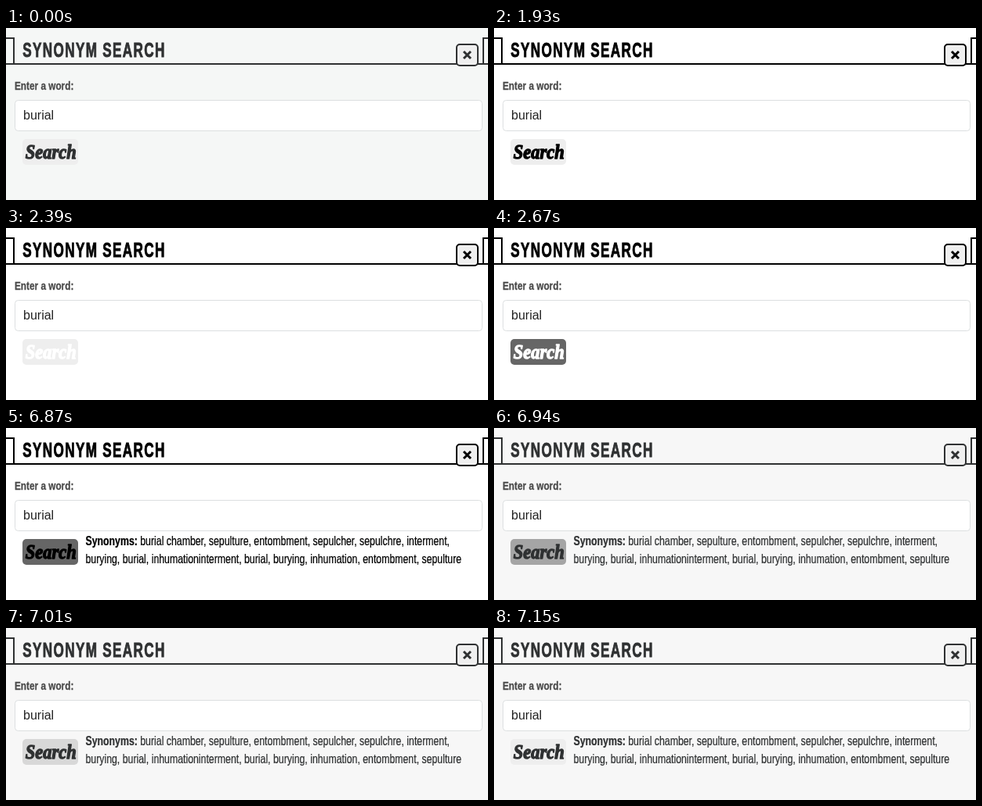
Animation, 615 px wide and 220 px high, one loop 7.68 s. Source, as an HTML page:

```html
<!DOCTYPE html>
<html lang="en">
<head>
<meta charset="utf-8">
<title>Synonym search</title>
<style>
  html, body { margin: 0; width: 100%; height: 100%; overflow: hidden; }
  svg { display: block; width: 615px; height: 220px; background: var(--page); }
  text { font: 16px "Liberation Sans", Arial, sans-serif; fill: var(--ink); white-space: pre; }
  .bold { font-weight: bold; }
  .title { font-size: 26px; font-weight: bold; letter-spacing: 2px; stroke: var(--ink); stroke-width: .9px; }
  .label { font-size: 15.2px; font-weight: bold; fill: #4a4a4a; stroke: #4a4a4a; stroke-width: .3px; }
  .field { fill: #222; }
  .script { font: italic bold 26px "Liberation Serif", Times, serif; fill: var(--caption); stroke: var(--caption); stroke-width: 1.4px; stroke-linejoin: round; }
  .line { fill: none; stroke: var(--ink); stroke-width: 2; }
  #results { stroke: var(--ink); stroke-width: .25px; }
</style>
</head>
<body>
<svg viewBox="0 0 615 220">
  <path class="line" d="M0 13H10V46M615 13H609V46M0 46H615"/>
  <text class="title" transform="translate(21.3 37) scale(.66 1)">SYNONYM SEARCH</text>

  <rect class="line" x="575" y="21" width="27" height="27" rx="4" style="fill:#efefef"/>
  <path class="line" d="M584 30l9 9m0-9l-9 9" style="stroke-width:3"/>

  <text class="label" transform="translate(11 79) scale(.776 1)">Enter a word:</text>
  <rect x="11.5" y="92.5" width="596" height="39" rx="4" fill="#fff" stroke="#dcdfe0"/>
  <text class="field" x="22" y="117">burial</text>

  <rect x="21" y="142" width="71" height="33" rx="5" fill="var(--button)"/>
  <text class="script" transform="translate(24.7 167) scale(.865 1)">Search</text>

  <g id="results" transform="translate(101.5 150) scale(.77 1)">
    <text><tspan class="bold">Synonyms: </tspan>burial chamber, sepulture, entombment, sepulcher, sepulchre, interment,</text>
    <text y="23">burying, burial, inhumationinterment, burial, burying, inhumation, entombment, sepulture</text>
  </g>
</svg>
<script>
const LOOP = 7680, STEP = 70;
const FOCUS = 1930, HOVER = 2390, ANSWER = 5610, LEAVE = 6870, BLUR = 6940;
const EASE = [0, .46, .84, .97, 1];
const results = document.getElementById("results");
const setVar = (name, value) => document.documentElement.style.setProperty("--" + name, value);

// Eased progress of a stepped fade that begins at start.
function fade(t, start) {
  const i = Math.floor((t - start) / STEP);
  return i < 0 ? 0 : EASE[Math.min(i, EASE.length - 1)];
}

function draw(now) {
  const t = now % LOOP;
  const active = t >= FOCUS && t < BLUR;
  const hovered = t >= HOVER && t < LEAVE;
  const ink = active ? "#000" : "#2f3132";
  const gray = Math.round(238 - 136 * (fade(t, HOVER) - fade(t, LEAVE)));

  setVar("page", active ? "#fff" : t < FOCUS ? "#f5f7f6" : "#f7f7f7");
  setVar("ink", ink);
  setVar("caption", hovered ? "#fff" : ink);
  setVar("button", `rgb(${gray},${gray},${gray})`);
  results.style.visibility = t >= ANSWER ? "visible" : "hidden";
  requestAnimationFrame(draw);
}
draw(0);
</script>
</body>
</html>
```
